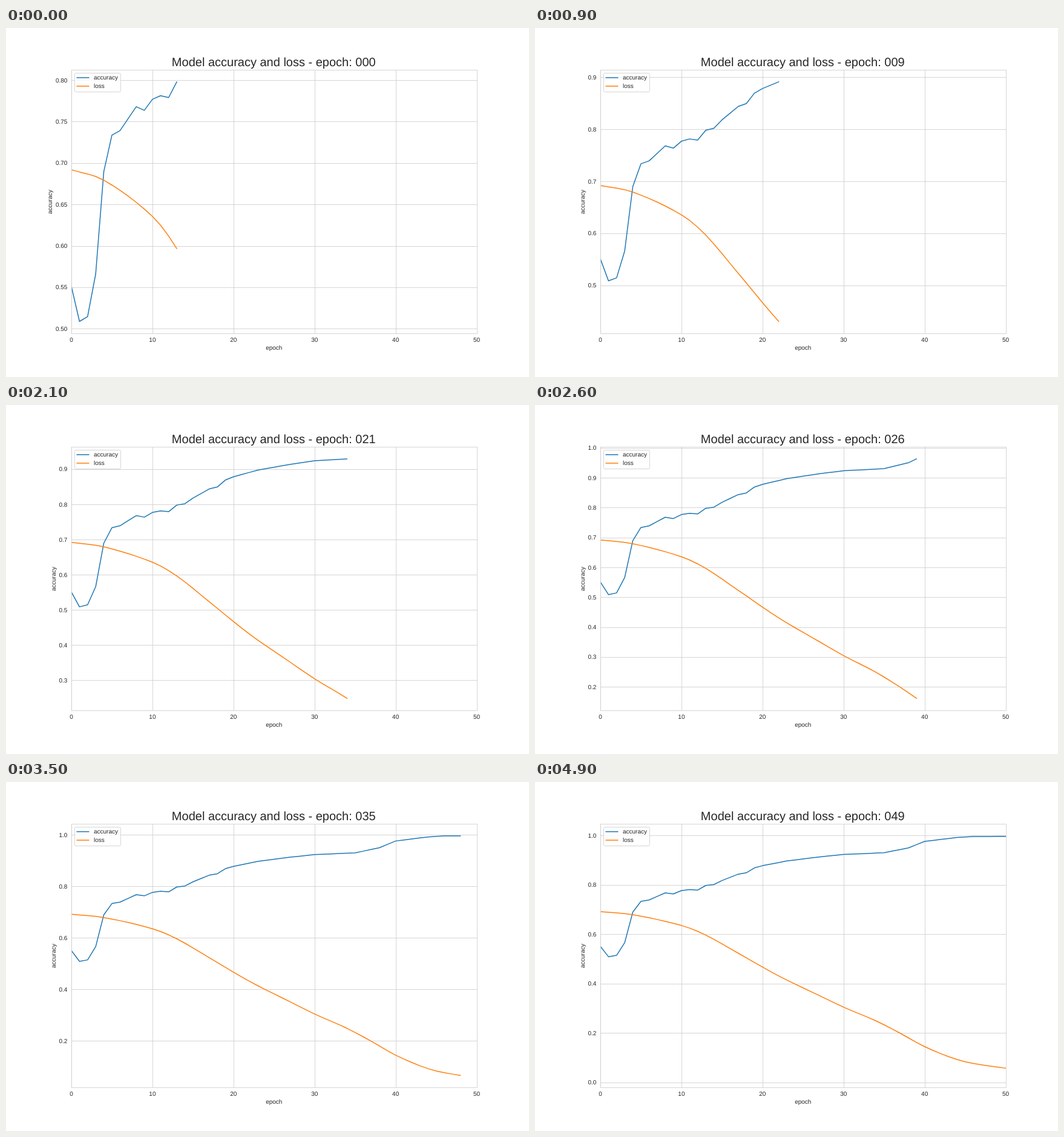
Recreate the animation shown at these times as an HTML page. Size 864x576 px, loop 5000 ms.

```html
<!DOCTYPE html>
<html lang="en">
<head>
<meta charset="utf-8">
<title>Model accuracy and loss</title>
<style>
  html, body { margin: 0; width: 100%; height: 100%; overflow: hidden; background: #fff; }
  svg { display: block; width: 864px; height: 576px; }
  text { font: 10px "Liberation Sans", Arial, sans-serif; fill: #262626; text-rendering: geometricPrecision; }
  .title { font-size: 20px; }
  .mid { text-anchor: middle; }
  .end { text-anchor: end; }
  .grid, .spine { fill: none; stroke: #ccc; stroke-width: .8; }
  .line { fill: none; stroke-width: 1.5; stroke-linecap: round; stroke-linejoin: round; }
  .acc { stroke: #1f77b4; }
  .loss { stroke: #ff7f0e; }
  .box { fill: #fff; fill-opacity: .8; stroke: #ccc; stroke-opacity: .8; }
</style>
</head>
<body>
<svg viewBox="0 0 864 576">
  <defs><clipPath id="plot"><rect x="108" y="69" width="670" height="435"/></clipPath></defs>
  <g clip-path="url(#plot)">
    <path class="grid" id="xGrid"/>
    <path class="grid" id="yGrid"/>
    <polyline class="line acc" id="acc"/>
    <polyline class="line loss" id="loss"/>
  </g>
  <rect class="spine" x="108.5" y="69.5" width="670" height="435"/>
  <g id="xLabels"></g>
  <g id="yLabels"></g>
  <text class="mid" x="442.8" y="531">epoch</text>
  <text class="mid" id="yTitle">accuracy</text>
  <text class="mid title" id="title" x="442.3" y="63"></text>
  <rect class="box" x="113.5" y="74.5" width="76" height="31" rx="2"/>
  <path class="line acc" d="M117 82H137"/>
  <path class="line loss" d="M117 96H137"/>
  <text x="145" y="85">accuracy</text>
  <text x="145" y="99">loss</text>
</svg>
<script>
const LEFT = 108, TOP = 69.12, W = 669.6, H = 434.88, BOTTOM = TOP + H;
const FRAMES = 50, STEP_MS = 100, LEAD = 14, LAST = 62;

// Key points as [epoch, value]; past epoch 50 they only drive the vertical scale.
const accKeys = [
  [0, .551], [1, .5088], [2, .5145], [3, .5662], [4, .6897], [5, .7335], [6, .739],
  [8, .7679], [9, .7635], [10, .7769], [11, .7812], [12, .779], [13, .7979],
  [14, .8016], [15, .8178], [17, .8436], [18, .8492], [19, .869], [20, .8781],
  [23, .8972], [27, .9136], [30, .9236], [35, .9305], [38, .9503], [40, .9765],
  [44, .9923], [46, .9961], [62, .999]];
const lossKeys = [
  [0, .6918], [4, .6792], [10, .6355], [13, .5966], [17, .5233], [22, .4309],
  [27, .3515], [30, .3045], [34, .2487], [37, .1984], [40, .1444], [44, .092],
  [47, .0708], [53, .0462], [62, .0277]];

const linear = (keys, i, u) => keys[i][1] + (keys[i + 1][1] - keys[i][1]) * u;

// Cubic Hermite with slopes taken from the neighbouring keys.
function smooth(keys, i, u) {
  const slope = k => {
    const a = keys[Math.max(k - 1, 0)], b = keys[Math.min(k + 1, keys.length - 1)];
    return (b[1] - a[1]) / (b[0] - a[0]);
  };
  const gap = keys[i + 1][0] - keys[i][0], w = u * u * (3 - 2 * u);
  return linear(keys, i, w)
    + gap * u * (1 - u) * ((1 - u) * slope(i) - u * slope(i + 1));
}

function sample(keys, blend) {
  return Array.from({ length: LAST + 1 }, (_, x) => {
    const i = Math.max(0, keys.findIndex(k => k[0] >= x) - 1);
    return blend(keys, i, (x - keys[i][0]) / (keys[i + 1][0] - keys[i][0]));
  });
}

const acc = sample(accKeys, linear), loss = sample(lossKeys, smooth);

const el = id => document.getElementById(id);
const snap = v => Math.floor(v + .5) + .5;
const xAt = epoch => LEFT + W * epoch / 50;
const label = (cls, x, y, s) => `<text class="${cls}" x="${x}" y="${y}">${s}</text>`;

const xTicks = [0, 10, 20, 30, 40, 50];
el("xGrid").setAttribute("d", xTicks.map(t => `M${snap(xAt(t))} 69V504`).join(""));
el("xLabels").innerHTML = xTicks.map(t => label("mid", xAt(t), 518, t)).join("");

function draw(n) {
  const a = acc.slice(0, n + LEAD), l = loss.slice(0, n + LEAD);
  const all = a.concat(l), min = Math.min(...all), max = Math.max(...all);
  const pad = (max - min) * .05, low = min - pad, span = max - min + 2 * pad;
  const yAt = v => BOTTOM - H * (v - low) / span;
  const points = list => list.map((v, i) => xAt(i).toFixed(2) + "," + yAt(v).toFixed(2)).join(" ");

  const step = [.05, .1, .2].find(s => s >= span / 9);
  const digits = step < .1 ? 2 : 1;
  let grid = "", labels = "";
  for (let k = Math.ceil(low / step); k * step <= low + span; k++) {
    const y = yAt(k * step);
    grid += `M108 ${snap(y)}H778`;
    labels += label("end", 101.4, Math.round(y + 3.6), (k * step).toFixed(digits));
  }

  el("yGrid").setAttribute("d", grid);
  el("yLabels").innerHTML = labels;
  el("acc").setAttribute("points", points(a));
  el("loss").setAttribute("points", points(l));
  el("yTitle").setAttribute("transform", `translate(${digits === 2 ? 76 : 82} 287) rotate(-90)`);
  el("title").textContent = "Model accuracy and loss - epoch: " + String(n).padStart(3, "0");
}

const begin = performance.now();
let shown = -1;
function tick() {
  const n = Math.floor((performance.now() - begin) / STEP_MS) % FRAMES;
  if (n !== shown) draw(shown = n);
  requestAnimationFrame(tick);
}
tick();
</script>
</body>
</html>
```
